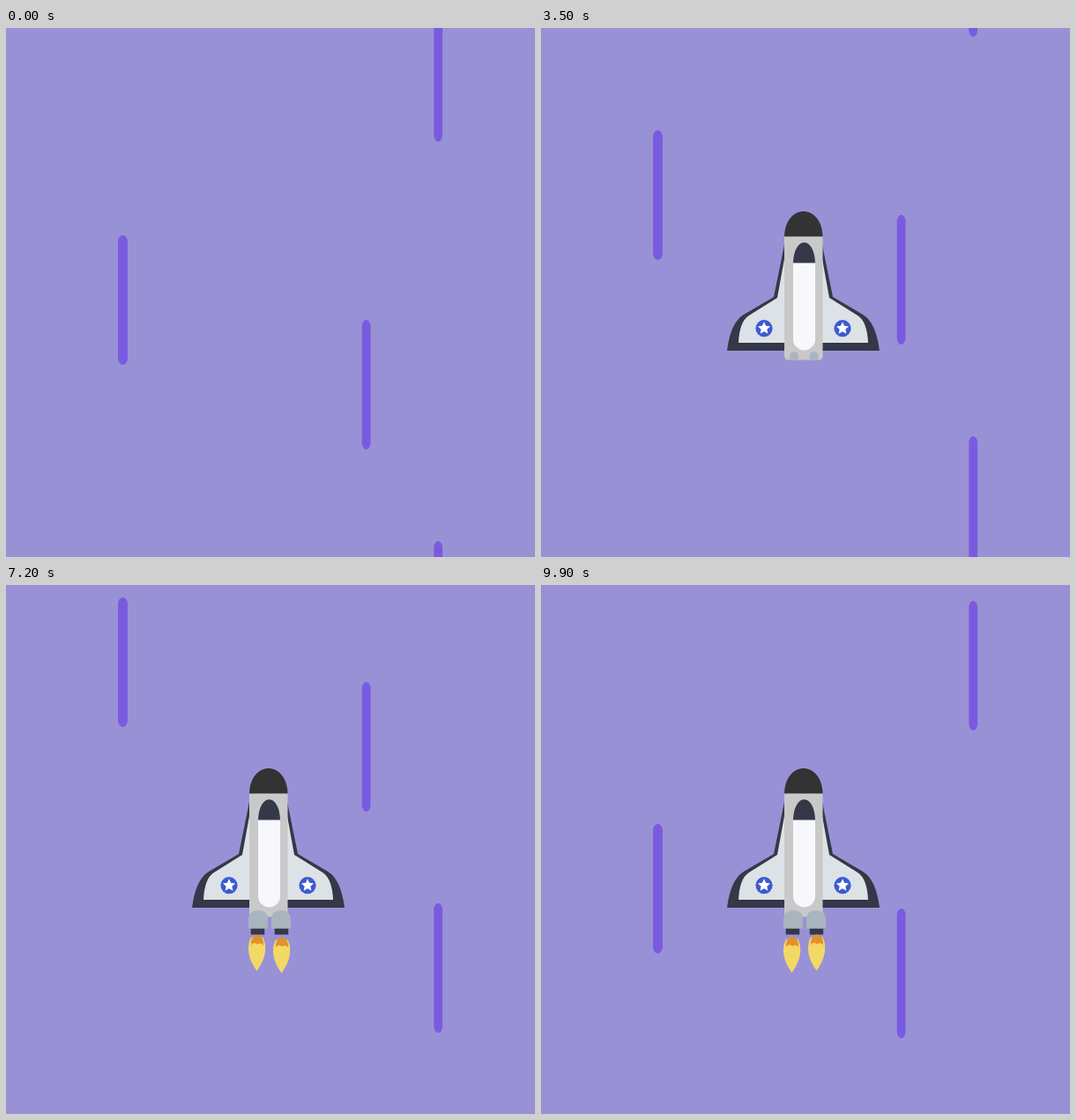
An HTML page for the animation above (10000 ms loop, 600x600 px).

```html
<!DOCTYPE html>
<html lang="en">
<head>
<meta charset="utf-8">
<title>Shuttle</title>
<style>
html, body { margin: 0; width: 100%; height: 100%; overflow: hidden; background: #9991d6; }
svg { display: block; width: 100vw; height: 100vh; }
</style>
</head>
<body>
<svg viewBox="0 0 600 600">
  <defs>
    <g id="streaks" fill="#7a5be0">
      <rect x="127" y="0" width="11" height="147" rx="5.5" ry="7.5"/>
      <rect x="403.7" y="96" width="9.8" height="147" rx="4.9" ry="7.5"/>
      <rect x="485.3" y="347" width="9.8" height="147" rx="4.9" ry="7.5"/>
    </g>
    <g id="wing">
      <path id="edge" fill="#343848"/>
      <path id="panel" fill="#dde2e6"/>
      <g id="badge">
        <circle cx="253" cy="340.7" r="9.6" fill="#3b5bd0"/>
        <path id="star" fill="#fff"/>
      </g>
    </g>
    <path id="pod" d="M275 389.5V380Q275 369 286 369T297 380V389.5Z" fill="#a9b5be"/>
    <g id="flame">
      <path d="M278 401C272 412 275 426 284.5 439C294 426 297 412 291.5 401Z" fill="#f2d965"/>
      <path d="M278 410C277 394 293 394 292 410Q289 406 285 409Q281 405 278 410Z" fill="#e2912f"/>
    </g>
  </defs>
  <g id="sky">
    <use href="#streaks" y="-1200"/>
    <use href="#streaks" y="-600"/>
    <use href="#streaks"/>
  </g>
  <g id="left"><use href="#wing"/></g>
  <g id="right"><use href="#wing"/></g>
  <g id="body">
    <path d="M276 236H319.5V371.5Q319.5 376.5 314.5 376.5H281Q276 376.5 276 371.5Z" fill="#c9c9ca"/>
    <path d="M276 236.5C277 198.500 318.500 198.500 319.500 236.500Z" fill="#333"/>
    <path d="M286 266H311V353a12.5 12.5 0 0 1-25 0Z" fill="#f7f8fc"/>
    <path d="M286 266.500C287 235.500 310 235.500 311 266.500Z" fill="#343848"/>
  </g>
  <g id="nozzles" fill="#343848">
    <rect x="277.700" y="389.500" width="15.500" height="7"/>
    <rect x="304.700" y="389.500" width="15.500" height="7"/>
  </g>
  <g id="podL"><use href="#pod"/></g>
  <g id="podR"><use href="#pod" x="26"/></g>
  <g id="fireL"><use href="#flame"/></g>
  <g id="fireR"><use href="#flame" x="28"/></g>
</svg>
<script>
const LOOP = 10000, STEP = 100;
const el = id => document.getElementById(id);
const set = (id, name, value) => el(id).setAttribute(name, value);
const ramp = (t, a, b) => Math.min(1, Math.max(0, (t - a) / (b - a)));
const smooth = u => u * u * (3 - 2 * u);

// Time and total distance of the streaks, which repeat every 600 px.
const travel = [[0, 235], [1600, 2157], [3500, 4316], [5100, 6140], [7200, 8414], [8900, 10111], [9900, 11071]];

// Wing outlines: apart and docked.
const edge = [
  [228, 247, 217, 300, 182, 321, 168, 329, 164, 358.5, 228.5, 358.5],
  [276, 246, 264, 305, 230, 325, 215, 334, 211, 366, 276, 366]
];
const panel = [
  [228, 287, 222, 320, 199, 335, 190, 341, 189, 357.5, 228, 357.5],
  [276, 262, 268, 306, 236, 326, 225, 333, 224, 357, 276, 357]
];

function outline([from, to], k) {
  const p = from.map((v, i) => (v + (to[i] - v) * k).toFixed(2));
  return `M${p[0]} ${p[1]}L${p[2]} ${p[3]}L${p[4]} ${p[5]}Q${p[6]} ${p[7]} ${p[8]} ${p[9]}L${p[10]} ${p[11]}Z`;
}

function starPath(x, y, r) {
  const pts = [];
  for (let i = 0; i < 10; i++) {
    const a = (i / 5 - 0.5) * Math.PI, d = i % 2 ? r * 0.48 : r;
    pts.push(`${(x + d * Math.cos(a)).toFixed(2)} ${(y + d * Math.sin(a)).toFixed(2)}`);
  }
  return `M${pts.join("L")}Z`;
}

function scaleAt(id, x, y, s, dy = 0) {
  set(id, "transform", `translate(${x} ${y + dy}) scale(${s}) translate(${-x} ${-y})`);
  set(id, "visibility", s > 0 ? "visible" : "hidden");
}

function distance(t) {
  const i = travel.findLastIndex(p => p[0] <= t);
  const [t0, y0] = travel[i];
  if (i === travel.length - 1) return y0;
  const [t1, y1] = travel[i + 1];
  return y0 + (y1 - y0) * (t - t0) / (t1 - t0);
}

function draw(t) {
  set("sky", "transform", `translate(0 ${distance(t) % 600 + 600 - 600})`);

  scaleAt("body", 297.7, 292, smooth(ramp(t, 400, 1100)));

  const k = t < 1600 ? ramp(t, 1300, 1600) * 0.3 - 0.3 : smooth(ramp(t, 1600, 2300));
  set("edge", "d", outline(edge, k));
  set("panel", "d", outline(panel, k));
  const shown = ramp(t, 1300, 1600);
  set("left", "opacity", shown);
  set("right", "opacity", shown);
  set("right", "transform", `translate(${595 + 3 * (1 - k)} 0) scale(-1 1)`);
  scaleAt("badge", 253, 340.7, smooth(ramp(t, 2400, 2900)));

  const pod = ramp(t, 3300, 3740);
  scaleAt("podL", 288, 366, pod);
  scaleAt("podR", 307.5, 366, pod);
  const slide = ramp(t, 3900, 4300);
  set("nozzles", "transform", `translate(0 ${-8 * (1 - slide)})`);
  set("nozzles", "visibility", slide > 0 ? "visible" : "hidden");

  const fire = ramp(t, 4500, 5200);
  const sway = ramp(t, 5200, 5600) * Math.sin(t / 1000 * 2 * Math.PI);
  scaleAt("fireL", 285, 397, fire, -1.2 * sway);
  scaleAt("fireR", 313, 397, fire, 1.8 * sway - 0.5);
}

set("star", "d", starPath(253, 340.7, 7.4));
const start = performance.now();
function tick() {
  const t = (performance.now() - start) % LOOP;
  draw(Math.floor(t / STEP) * STEP);
  requestAnimationFrame(tick);
}
draw(0);
requestAnimationFrame(tick);
</script>
</body>
</html>
```
